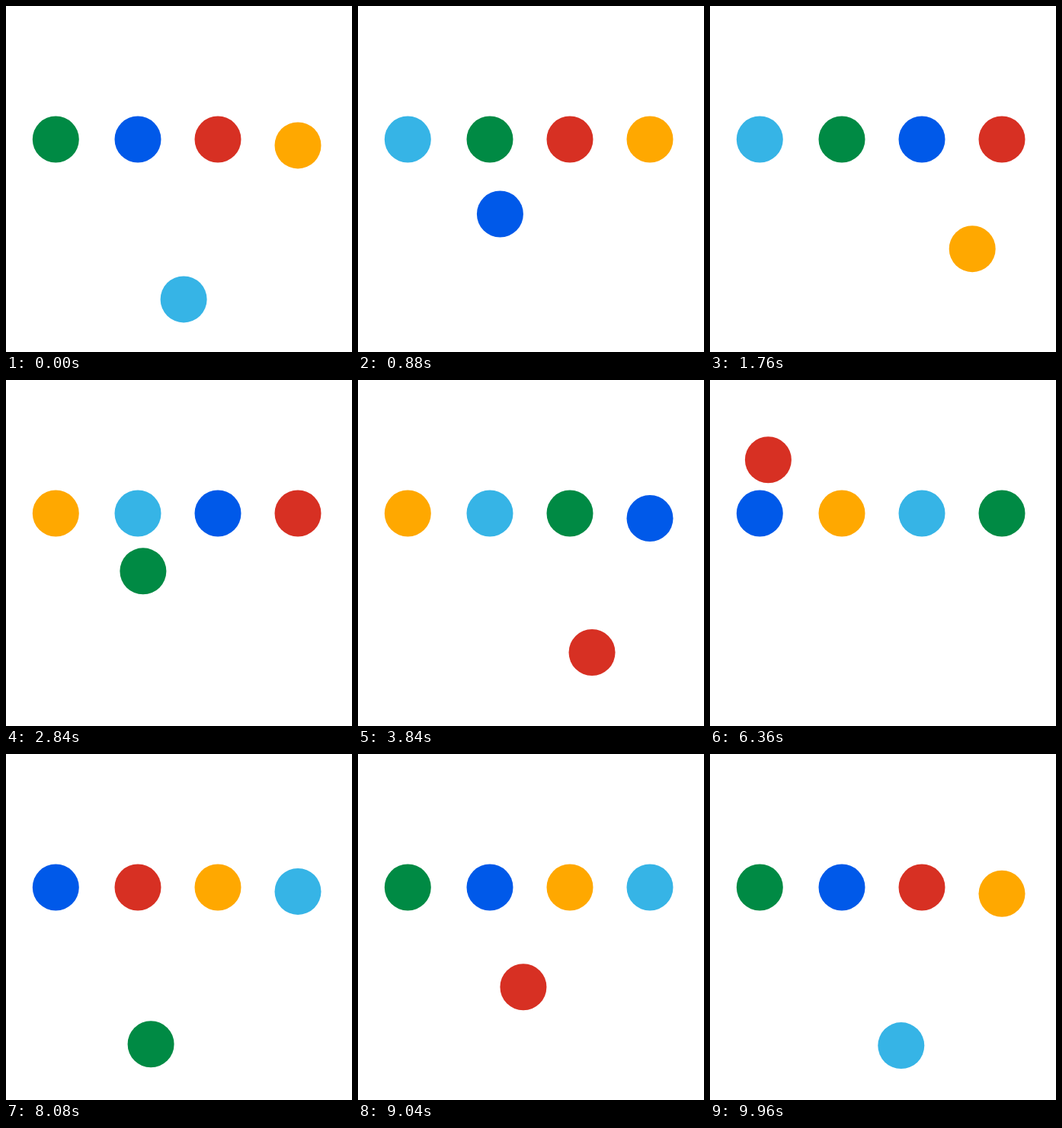
An HTML page with a canvas for the animation above (10000 ms loop, 454 px wide and 454 px high).

```html
<!DOCTYPE html>
<html lang="en">
<head>
<meta charset="utf-8">
<title>Ball relay</title>
<style>
html, body { margin: 0; width: 100%; height: 100%; overflow: hidden; background: #fff; }
canvas { display: block; }
</style>
</head>
<body>
<canvas id="stage" width="454" height="454"></canvas>
<script>
const ctx = document.getElementById('stage').getContext('2d');
const LOOP = 10000, TURN = 2000, STEP = 40;
const RADIUS = 30.5, ROW = 175;
const SLOTS = [65.3, 173, 278, 383];
const COLORS = ['#36b4e6', '#008a44', '#0059e9', '#d73023', '#ffa800'];

// Each move follows a cubic with vertical handles (positive is downwards).
const MOVES = [
  { start: 2251, span: 580, from: 0, to: 1, out: -147, into: -147 },
  { start: 4756, span: 580, from: 1, to: 2, out: 200, into: 147 },
  { start: 7180, span: 580, from: 2, to: 3, out: -123.6, into: -123.6 },
  { start: 9611, span: 716, from: 3, to: 0, out: 281, into: 279.5 }
];
const DIP = { start: 7760, down: 200, up: 300, depth: 8.3 };

// Slows towards the apex, then speeds up again.
function pace(p) {
  const x = p - 0.509;
  return Math.min(1, Math.max(0, 0.458 + 0.644 * x + (x < 0 ? -0.507 : 0.935) * x * x));
}

function along(move, age) {
  const t = pace((age - move.start) / move.span), s = 1 - t;
  const a = SLOTS[move.from], b = SLOTS[move.to];
  return {
    x: a + (b - a) * t * t * (3 - 2 * t),
    y: ROW + 3 * t * s * (s * move.out + t * move.into)
  };
}

function dip(age) {
  const down = (age - DIP.start) / DIP.down;
  const up = (age - DIP.start - DIP.down) / DIP.up;
  if (down <= 0 || up >= 1) return 0;
  if (down < 1) return DIP.depth * (1 - (1 - down) ** 3);
  return DIP.depth * (1 - up * up * (3 - 2 * up));
}

function position(age) {
  const last = MOVES[MOVES.length - 1];
  if (age + LOOP < last.start + last.span) age += LOOP;
  let slot = 0;
  for (const move of MOVES) {
    if (age < move.start) break;
    if (age < move.start + move.span) return along(move, age);
    slot = move.to;
  }
  return { x: SLOTS[slot], y: ROW + dip(age) };
}

function draw(time) {
  ctx.fillStyle = '#fff';
  ctx.fillRect(0, 0, 454, 454);
  COLORS.forEach((color, i) => {
    const { x, y } = position((time + i * TURN) % LOOP);
    ctx.fillStyle = color;
    ctx.beginPath();
    ctx.arc(x, y, RADIUS, 0, Math.PI * 2);
    ctx.fill();
  });
}

const begin = performance.now();
function tick() {
  const time = (performance.now() - begin) % LOOP;
  draw(Math.floor(time / STEP) * STEP);
  requestAnimationFrame(tick);
}
tick();
</script>
</body>
</html>
```
